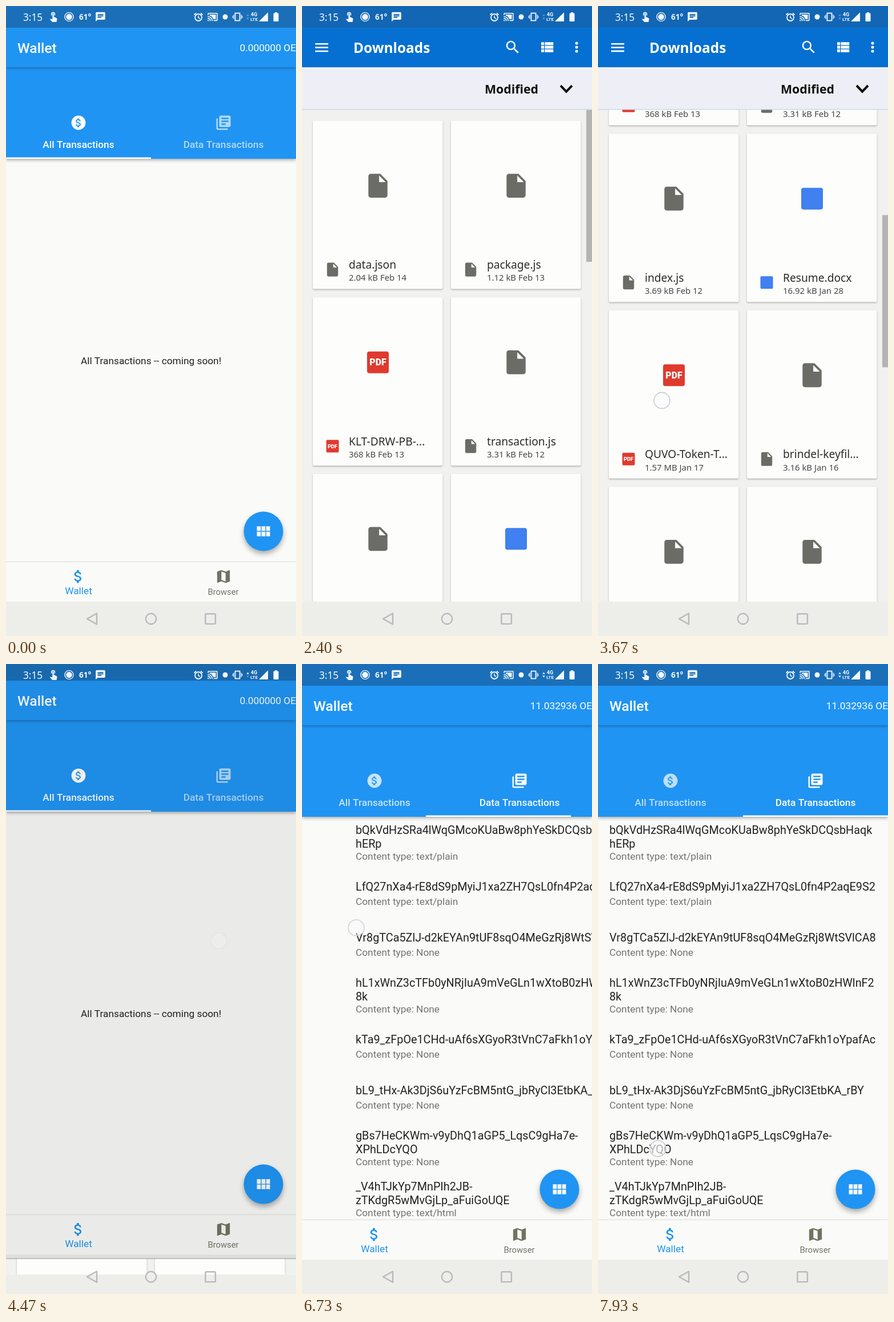
Recreate the animation shown at these times as an HTML page with a canvas. Size 508 by 1101 pixels, loop 8000 ms.

```html
<!DOCTYPE html>
<html lang="en">
<head>
<meta charset="utf-8">
<title>Wallet</title>
<style>
html, body { margin: 0; width: 100%; height: 100%; overflow: hidden; background: #fafafa; }
canvas { display: block; width: 100vw; height: 100vh; }
</style>
</head>
<body>
<canvas id="stage"></canvas>
<script>
const W = 508, H = 1101, LOOP = 8000;
const BLUE = '#2094f3', PAPER = '#fafbf8', BAR = '#edeeea';
const ROBOTO = 'Roboto, sans-serif', NOTO = '"Noto Sans", sans-serif';
const canvas = document.getElementById('stage');
const c = canvas.getContext('2d');
const dpr = window.devicePixelRatio || 1;
canvas.width = W * dpr;
canvas.height = H * dpr;

// Icons on a 24 unit grid
const icons = {
  dollar: 'M11.8 10.9c-2.27-.59-3-1.2-3-2.15 0-1.09 1.01-1.85 2.7-1.85 1.78 0 2.44.85 2.5 2.1h2.21c-.07-1.72-1.12-3.3-3.21-3.81V3h-3v2.16c-1.94.42-3.5 1.68-3.5 3.61 0 2.31 1.91 3.46 4.7 4.13 2.5.6 3 1.48 3 2.41 0 .69-.49 1.79-2.7 1.79-2.06 0-2.87-.92-2.98-2.1h-2.2c.12 2.19 1.76 3.42 3.68 3.83V21h3v-2.15c1.95-.37 3.5-1.5 3.5-3.55 0-2.84-2.43-3.81-4.7-4.4z',
  books: 'M4 6H2v14c0 1.1.9 2 2 2h14v-2H4V6zm16-4H8c-1.1 0-2 .9-2 2v12c0 1.1.9 2 2 2h12c1.1 0 2-.9 2-2V4c0-1.1-.9-2-2-2zm-1 9H9V9h10v2zm-4 4H9v-2h6v2zm4-8H9V5h10v2z',
  map: 'M20.5 3l-.16.03L15 5.1 9 3 3.36 4.9c-.21.07-.36.25-.36.48V20.5c0 .28.22.5.5.5l.16-.03L9 18.9l6 2.1 5.64-1.9c.21-.07.36-.25.36-.48V3.5c0-.28-.22-.5-.5-.5zM15 19l-6-2.11V5l6 2.11V19z',
  file: 'M6 2c-1.1 0-2 .9-2 2v16c0 1.1.9 2 2 2H18c1.1 0 2-.9 2-2V8l-6-6H6zm7 7V3.5L18.5 9H13z',
  grid: 'M3.5 11.5h5V5.5h-5zm0 7h5v-6h-5zm6 0h5v-6h-5zm6 0h5v-6h-5zm-6-7h5V5.5h-5zm6-6v6h5V5.5z',
  list: 'M3 13h2v-2H3zm0 4h2v-2H3zm0-8h2V7H3zm4 4h14v-2H7zm0 4h14v-2H7zM7 7v2h14V7z',
  menu: 'M3 18h18v-2H3zm0-5h18v-2H3zm0-7v2h18V6z',
  search: 'M15.5 14h-.79l-.28-.27C15.41 12.59 16 11.11 16 9.5 16 5.91 13.09 3 9.5 3S3 5.91 3 9.5 5.91 16 9.5 16c1.61 0 3.09-.59 4.23-1.57l.27.28v.79l5 4.99L20.49 19l-4.99-5zm-6 0C7.01 14 5 11.99 5 9.5S7.01 5 9.5 5 14 7.01 14 9.5 11.99 14 9.5 14z',
  rows: 'M4 14h4v-4H4zm0 5h4v-4H4zM4 9h4V5H4zm5 5h12v-4H9zm0 5h12v-4H9zM9 5v4h12V5z',
  touch: 'M9 11.24V7.5C9 6.12 10.12 5 11.5 5S14 6.12 14 7.5v3.74c1.21-.81 2-2.18 2-3.74C16 5.01 13.99 3 11.5 3S7 5.01 7 7.5c0 1.56.79 2.93 2 3.74zm9.84 4.63l-4.54-2.26c-.17-.07-.35-.11-.54-.11H13v-6c0-.83-.67-1.5-1.5-1.5S10 6.67 10 7.5v10.74l-3.43-.72c-.31-.06-.74.01-1.03.3l-.79.8 4.94 4.94c.27.27.65.44 1.06.44h6.79c.75 0 1.33-.55 1.44-1.28l.75-5.27c.1-.66-.3-1.34-.89-1.58z',
  chat: 'M20 2H4c-1.1 0-2 .9-2 2v18l4-4h14c1.1 0 2-.9 2-2V4c0-1.1-.9-2-2-2zM6 9h12v2H6zm8 5H6v-2h8zm4-6H6V6h12z',
  cast: 'M21 3H3c-1.1 0-2 .9-2 2v3h2V5h18v14h-7v2h7c1.1 0 2-.9 2-2V5c0-1.1-.9-2-2-2zM1 18v3h3c0-1.66-1.34-3-3-3zm0-4v2c2.76 0 5 2.24 5 5h2c0-3.87-3.13-7-7-7zm0-4v2c4.97 0 9 4.03 9 9h2c0-6.08-4.93-11-11-11zM5 7v1.6c4 1.3 7.1 4.4 8.4 8.4H19V7z'
};
for (const k in icons) icons[k] = new Path2D(icons[k]);

const clamp = v => Math.min(1, Math.max(0, v));
const span = (t, a, b) => clamp((t - a) / (b - a));
const mix = (a, b, k) => a + (b - a) * k;

// Cubic bezier (.4, 0, .2, 1)
function standard(x) {
  let lo = 0, hi = 1;
  for (let i = 0; i < 20; i++) {
    const s = (lo + hi) / 2, r = 1 - s;
    if (1.2 * r * r * s + 0.6 * r * s * s + s * s * s < x) lo = s; else hi = s;
  }
  return 3 * (1 - lo) * lo * lo + lo * lo * lo;
}

// Linear track through [time, ...values] keys
function track(t, keys) {
  let i = 1;
  while (i < keys.length - 1 && t > keys[i][0]) i++;
  const a = keys[i - 1], b = keys[i], k = span(t, a[0], b[0]);
  return a.slice(1).map((v, n) => mix(v, b[n + 1], k));
}

function rect(x, y, w, h, fill) {
  c.fillStyle = fill;
  c.fillRect(x, y, w, h);
}

function round(x, y, w, h, r, fill) {
  c.beginPath();
  c.roundRect(x, y, w, h, r);
  c.fillStyle = fill;
  c.fill();
}

function disc(x, y, r, fill) {
  c.beginPath();
  c.arc(x, y, r, 0, 7);
  c.fillStyle = fill;
  c.fill();
}

function line(points, color, width) {
  c.beginPath();
  points.forEach(p => c.lineTo(p[0], p[1]));
  c.strokeStyle = color;
  c.lineWidth = width;
  c.stroke();
}

// y is the middle of the capitals
function text(s, x, y, size, color, { font = ROBOTO, weight = 400, align = 'left' } = {}) {
  c.font = `${weight} ${size}px ${font}`;
  c.textAlign = align;
  c.fillStyle = color;
  c.fillText(s, x, y + size * 0.36);
}

function icon(name, x, y, size, color) {
  c.save();
  c.translate(x, y);
  c.scale(size / 24, size / 24);
  c.translate(-12, -12);
  c.fillStyle = color;
  c.fill(icons[name], 'evenodd');
  c.restore();
}

function shadowed(color, blur, dy, draw) {
  c.save();
  c.shadowColor = color;
  c.shadowBlur = blur * dpr;
  c.shadowOffsetY = dy * dpr;
  draw();
  c.restore();
}

function clipped(x, y, w, h, draw) {
  c.save();
  c.beginPath();
  c.rect(x, y, w, h);
  c.clip();
  draw();
  c.restore();
}

const entries = [
  [290, 'text/plain', 'bQkVdHzSRa4lWqGMcoKUaBw8phYeSkDCQsbHaqk', 'hERp'],
  [389, 'text/plain', 'LfQ27nXa4-rE8dS9pMyiJ1xa2ZH7QsL0fn4P2aqE9S2'],
  [478, 'None', 'Vr8gTCa5ZlJ-d2kEYAn9tUF8sqO4MeGzRj8WtSVlCA8'],
  [557, 'None', 'hL1xWnZ3cTFb0yNRjIuA9mVeGLn1wXtoB0zHWlnF2', '8k'],
  [656, 'None', 'kTa9_zFpOe1CHd-uAf6sXGyoR3tVnC7aFkh1oYpafAc'],
  [745, 'None', 'bL9_tHx-Ak3DjS6uYzFcBM5ntG_jbRyCl3EtbKA_rBY'],
  [824, 'None', 'gBs7HeCKWm-v9yDhQ1aGP5_LqsC9gHa7e-', 'XPhLDcYQO'],
  [913, 'text/html', '_V4hTJkYp7MnPIh2JB-', 'zTKdgR5wMvGjLp_aFuiGoUQE']
];

function dataPage(x) {
  for (const [y, type, first, second] of entries) {
    text(first, x + 20, y, 19.8, '#212121');
    if (second) text(second, x + 20, y + 23.4, 19.8, '#212121');
    text('Content type: ' + type, x + 20, y + (second ? 45.8 : 26), 17.3, '#737373');
  }
}

// Remaining distance of the second tab's page
function pageOffset(t) {
  if (t < 6680) return mix(W, 140, span(t, 6470, 6680));
  const d = 140 * Math.exp((6680 - t) / 80);
  return d < 0.3 ? 0 : d;
}

function wallet(t) {
  const off = pageOffset(t), tab = 1 - off / W;
  const dial = span(t, 680, 830) * (1 - span(t, 1530, 1670));

  rect(0, 0, W, H, PAPER);
  clipped(0, 267, W, 705, () => {
    text('All Transactions -- coming soon!', 254 - W + off, 620, 17.3, '#212121', { align: 'center' });
    if (off < W) dataPage(off);
  });

  shadowed('rgba(0,0,0,.35)', 6, 2, () => rect(0, 38, W, 229, BLUE));
  c.globalAlpha = mix(1, 0.7, tab);
  disc(127, 204, 12.4, '#fff');
  text('All Transactions', 127, 242, 17.3, '#fff', { weight: 500, align: 'center' });
  c.globalAlpha = 1;
  icon('dollar', 127, 204, 21, BLUE);
  c.globalAlpha = mix(0.65, 1, tab);
  icon('books', 381, 204, 30, '#fff');
  text('Data Transactions', 381, 242, 17.3, '#fff', { weight: 500, align: 'center' });
  c.globalAlpha = 1;
  rect(254 * tab, 264.5, 254, 2.5, '#fff');

  rect(0, 107, W, 865, `rgba(255,255,255,${0.8 * dial})`);
  shadowed('rgba(0,0,0,.3)', 5, 1.5, () => rect(0, 38, W, 69, BLUE));
  rect(0, 0, W, 38, '#1a6fb8');
  text('Wallet', 20, 73, 24.7, '#fff', { weight: 500 });
  text(t < 5000 ? '0.000000 OE' : '11.032936 OE', W, 73, 17.3, '#fff', { align: 'right' });

  shadowed('rgba(0,0,0,.12)', 2, -1, () => rect(0, 972, W, 69, PAPER));
  icon('dollar', 126.5, 997, 29.7, '#2094ea');
  text('Wallet', 127, 1022, 17.3, '#2094ea', { align: 'center' });
  icon('map', 381, 997, 29.7, '#6f735f');
  text('Browser', 380.5, 1023.5, 14.8, '#72736c', { align: 'center' });
  rect(0, 1041, W, 60, BAR);

  if (dial > 0) {
    c.globalAlpha = dial;
    shadowed('rgba(60,60,90,.4)', 4, 1.5, () => round(277, 819, 113, 33, 6, '#fdfdfd'));
    text('Open Wallet', 287, 836, 17.3, '#212121');
    c.globalAlpha = 1;
    shadowed('rgba(0,0,0,.32)', 9, 5, () => disc(450, 835.5, 28.5 * dial, BLUE));
    icon('dollar', 449.5, 835.5, 29.7 * dial, '#fff');
  }
  shadowed('rgba(0,0,0,.32)', 10, 5, () => disc(451, 918, 34.5, BLUE));
  icon(dial > 0.5 ? 'list' : 'grid', 451, 918, 32.5, '#f6f9fc');
}

// Two files per row: kind, name, details
const files = [
  ['file', 'data.json', '2.04 kB Feb 14'], ['file', 'package.js', '1.12 kB Feb 13'],
  ['pdf', 'KLT-DRW-PB-...', '368 kB Feb 13'], ['file', 'transaction.js', '3.31 kB Feb 12'],
  ['file', 'index.js', '3.69 kB Feb 12'], ['doc', 'Resume.docx', '16.92 kB Jan 28'],
  ['pdf', 'QUVO-Token-T...', '1.57 MB Jan 17'], ['file', 'brindel-keyfil...', '3.16 kB Jan 16'],
  ['file', 'keyfile.json', '3.16 kB Jan 16'], ['file', 'backup.json', '3.17 kB Jan 15'],
  ['file', 'notes.txt', '1.20 kB Jan 12'], ['file', 'report.txt', '2.48 kB Jan 11']
];

function fileIcon(kind, x, y, size) {
  if (kind === 'file') return icon('file', x, y, size * 1.32, '#6b6c66');
  round(x - size / 2, y - size / 2, size, size, size * 0.1, kind === 'pdf' ? '#e03a2e' : '#4080f0');
  if (kind === 'pdf') text('PDF', x, y, size * 0.42, '#fff', { weight: 900, align: 'center' });
}

function scrollTop(t) {
  return track(t, [[2640, 0], [2750, 60], [3000, 300], [3080, 375], [3200, 460], [3350, 535],
    [3500, 577], [3620, 590], [3670, 594], [3800, 668], [3920, 722], [4020, 734]])[0];
}

function picker(t) {
  const top = scrollTop(t);
  rect(0, 0, W, H, '#f1f1ef');
  clipped(0, 181, W, 860, () => {
    files.forEach(([kind, name, info], i) => {
      const x = i % 2 ? 261 : 19;
      const y = 200.5 + Math.floor(i / 2) * 308.6 - top;
      if (y > 1041 || y < -120) return;
      shadowed('rgba(0,0,0,.28)', 3, 1.5, () => round(x, y, 227.5, 294, 2, '#fdfdfc'));
      fileIcon(kind, x + 114, y + 113.5, 38);
      fileIcon(kind, x + 34.5, y + 260, 22);
      text(name, x + 63, y + 251.5, 19.2, '#2c2c2e', { font: NOTO });
      text(info, x + 63, y + 274.5, 14.9, '#46464a', { font: NOTO });
    });
    rect(498, 181 + top * 0.31, 10, 266, 'rgba(120,120,120,.5)');
  });
  rect(0, 107, W, 74, '#eeeef6');
  rect(0, 180, W, 1.5, '#c8dde8');
  text('Modified', 320, 145, 21.3, '#111', { font: NOTO, weight: 600 });
  line([[453, 139], [463, 149.5], [473, 139]], '#111', 4);

  rect(0, 0, W, 38, '#1266b4');
  rect(0, 38, W, 69, '#0570d2');
  icon('menu', 34.5, 72.5, 30.5, '#fff');
  text('Downloads', 90, 73, 24.4, '#fff', { font: NOTO, weight: 600 });
  icon('search', 369, 72, 30, '#fff');
  icon('rows', 429, 72, 30, '#fff');
  for (const y of [65, 72, 79]) disc(481, y, 2.5, '#fff');
  rect(0, 1041, W, 60, BAR);
}

function statusIcons(t) {
  const ink = '#f4f8ff';
  text('3:15', 30, 19.5, 17.2, ink, { font: NOTO });
  icon('touch', 83, 18, 20, ink);
  disc(110.5, 19, 5.3, ink);
  c.beginPath();
  c.arc(110.5, 19, 7.6, 0, 7);
  c.strokeStyle = ink;
  c.lineWidth = 1.4;
  c.stroke();
  text('61°', 128, 19.5, 13.5, ink, { font: NOTO, weight: 700 });
  icon('chat', 165.5, 19, 20, ink);

  c.beginPath();
  c.arc(337, 20, 6, 0, 7);
  c.strokeStyle = ink;
  c.lineWidth = 1.8;
  c.stroke();
  line([[337, 16.5], [337, 20.5], [340, 22]], ink, 1.4);
  line([[329.5, 15.5], [333, 12.5]], ink, 1.8);
  line([[344.5, 15.5], [341, 12.5]], ink, 1.8);
  icon('cast', 362, 19, 19, ink);
  disc(384, 19, 4.5, ink);
  c.strokeStyle = ink;
  c.lineWidth = 1.8;
  c.strokeRect(401.5, 12.5, 8, 13);
  for (const s of [-1, 1]) {
    line([[405.5 + s * 6.5, 15], [405.5 + s * 6.5, 23]], ink, 1.2);
    line([[405.5 + s * 8.2, 17], [405.5 + s * 8.2, 21]], ink, 1.2);
  }

  const second = Math.floor(t / 1000);
  [[-1, second >= 4], [1, second >= 5]].forEach(([s, on]) => {
    c.globalAlpha = on ? 1 : 0.35;
    c.beginPath();
    c.moveTo(421, 19 + s * 1.5);
    c.lineTo(426, 19 + s * 1.5);
    c.lineTo(423.5, 19 + s * 4.5);
    c.fillStyle = ink;
    c.fill();
  });
  c.globalAlpha = 1;
  text('4G', 434.5, 14.5, 9, ink, { weight: 700, align: 'center' });
  text('LTE', 434.5, 23, 8, ink, { weight: 700, align: 'center' });
  c.beginPath();
  c.moveTo(443, 27);
  c.lineTo(459, 27);
  c.lineTo(459, 11);
  c.fillStyle = ink;
  c.fill();
  round(468.5, 12.5, 9, 14.5, 1.2, ink);
  rect(471, 11, 4, 2, ink);
}

function navButtons() {
  const ink = '#b9b9bd';
  c.lineJoin = 'round';
  line([[142, 1071], [159, 1061.5], [159, 1080.5], [142, 1071], [159, 1061.5]], ink, 2.4);
  c.beginPath();
  c.arc(254, 1071, 9.2, 0, 7);
  c.stroke();
  c.beginPath();
  c.roundRect(349.3, 1062.3, 17.6, 17.6, 2);
  c.stroke();
  c.lineJoin = 'miter';
}

// Touches: keys of [time, x, y], then a fade
const touches = [
  [[480, 451, 918], [640, 451, 918]],
  [[1420, 450, 835], [1500, 450, 835]],
  [[2600, 82, 815], [2750, 84, 740], [3000, 89, 495], [3060, 91, 435]],
  [[3580, 112, 692], [3670, 112, 690], [3800, 115, 615], [3920, 119, 560]],
  [[4140, 373, 484], [4260, 373, 484]],
  [[6420, 470, 452], [6470, 465, 452], [6680, 95, 461]],
  [[7700, 105, 847], [8000, 105, 847]]
];

function pointer(t) {
  for (const keys of touches) {
    const end = keys[keys.length - 1][0];
    if (t < keys[0][0] || t > end + 280) continue;
    const [x, y] = track(t, keys);
    c.globalAlpha = span(t, keys[0][0] - 30, keys[0][0] + 60) * (1 - span(t, end, end + 280));
    disc(x, y, 14, 'rgba(250,250,252,.65)');
    c.strokeStyle = '#cacad4';
    c.lineWidth = 1.6;
    c.stroke();
    c.globalAlpha = 1;
  }
}

function draw(t) {
  c.setTransform(dpr, 0, 0, dpr, 0, 0);
  const closing = t >= 4305;
  const p = closing ? span(t, 4305, 4730) : span(t, 2000, 2425);
  const ease = standard(p), reveal = 1 - (1 - p) ** 6.4;
  const shown = closing ? 1 - ease : ease;
  const cover = closing ? 1 - reveal : reveal;

  rect(0, 0, W, H, BAR);
  c.save();
  c.translate(0, -22 * shown);
  wallet(t);
  c.restore();
  if (p > 0 && shown > 0.001) {
    rect(0, 0, W, H, `rgba(0,0,0,${0.15 * shown})`);
    const y = 45 * (1 - shown), top = 1056 * (1 - cover) + y;
    clipped(0, top, W, H - top, () => {
      c.translate(0, y);
      picker(t);
    });
    if (top > 1) rect(0, top, W, 1.5, 'rgba(90,90,100,.45)');
  }
  statusIcons(t);
  navButtons();
  pointer(t);
}

const start = performance.now();
function frame() {
  draw((performance.now() - start) % LOOP);
  requestAnimationFrame(frame);
}
frame();
</script>
</body>
</html>
```
